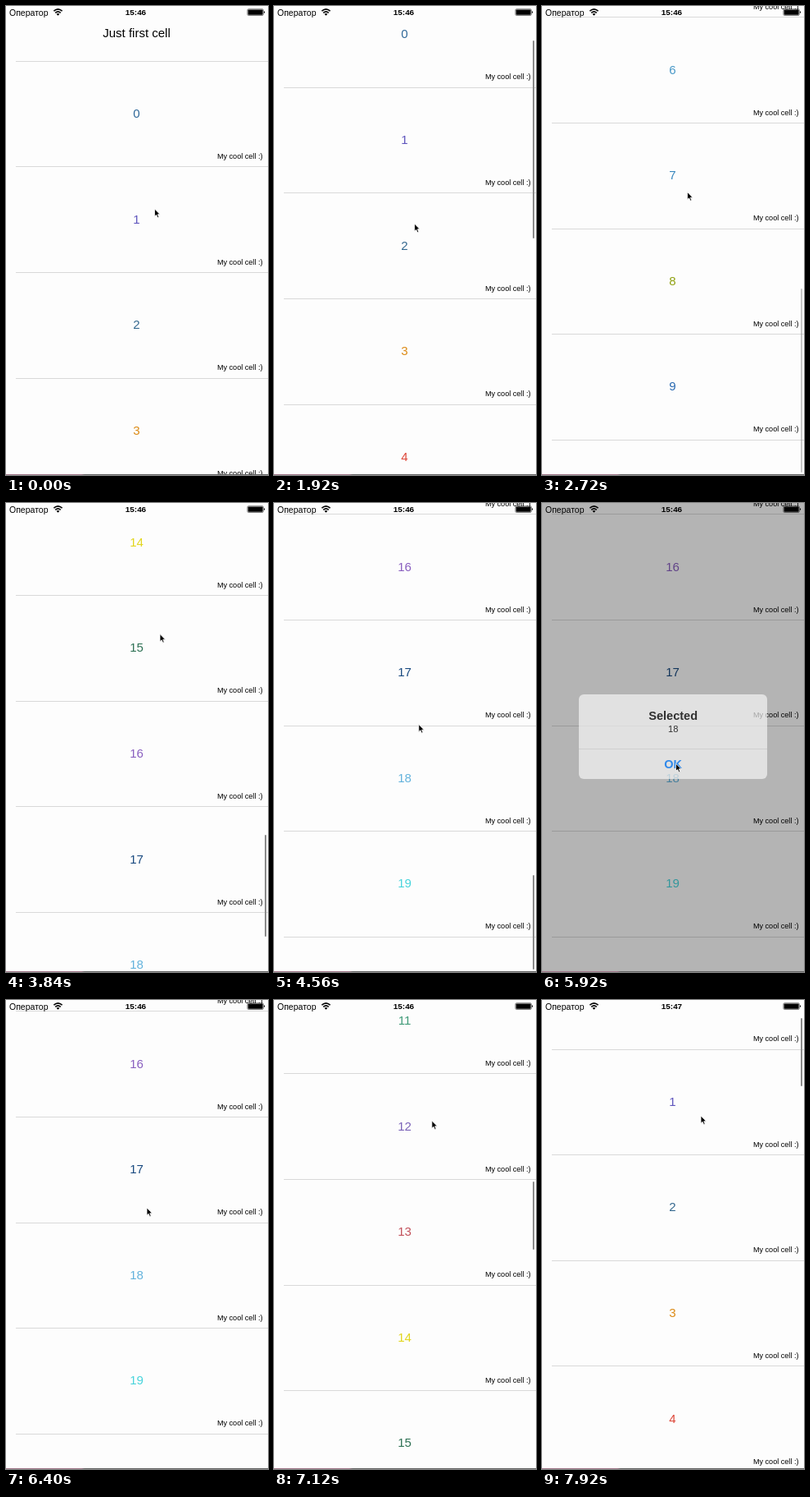
An HTML page that plays this animation: 320x571 px, repeating every 8000 ms.

```html
<!DOCTYPE html>
<html lang="en">
<head>
<meta charset="utf-8">
<title>Scrolling cells</title>
<style>
  html, body { margin: 0; width: 100%; height: 100%; overflow: hidden; background: #fdfdfd; }
  #stage {
    position: relative; width: 320px; height: 571px; overflow: hidden;
    background: #fdfdfd; color: #000;
    font-family: "Liberation Sans", Arial, sans-serif;
  }
  #stage * { position: absolute; white-space: nowrap; }
  #list { left: 0; top: 0; width: 320px; }
  #list h1, .cell b {
    margin: 0; left: 0; width: 319px; text-align: center;
    font: 15px/20px "Liberation Sans", Arial, sans-serif;
  }
  #list h1 { top: 23px; }
  .line { left: 12px; right: 0; height: 1px; background: #d9d9d9; }
  .cell { left: 0; width: 320px; height: 128.6px; }
  .cell b { top: 54px; }
  .cell i { right: 6.5px; top: 110px; font: 9.1px/13px "Liberation Sans", Arial, sans-serif; }
  .cell .line { bottom: -.8px; }
  #bar { left: 315.6px; width: 2.4px; border-radius: 2px; background: #8a8a8a; }
  #carrier { left: 4px; top: 1px; font-size: 10.5px; line-height: 14px; }
  #clock { left: 0; top: 1px; width: 317px; text-align: center; font-size: 9.9px; line-height: 14px; font-weight: bold; }
  #icons { left: 0; top: 0; }
  #dim { inset: 0; background: #000; }
  #alert {
    left: 44.5px; top: 232.9px; width: 230.4px; height: 103.4px;
    border-radius: 6px; background: rgba(247, 247, 247, .93); text-align: center;
  }
  #alert div { left: 0; width: 100%; line-height: 20px; }
  #alert .title { top: 15.5px; font-size: 14.5px; font-weight: bold; }
  #alert .message { top: 31.8px; font-size: 11.1px; }
  #alert .rule { top: 66.2px; height: 1px; background: rgba(0, 0, 0, .1); }
  #alert .ok { top: 75.4px; font-size: 14.5px; font-weight: bold; color: #007aff; }
  #cursor { left: 0; top: 0; overflow: visible; }
  #edge { left: 0; bottom: 0; width: 320px; height: 1px; background: linear-gradient(90deg, #a0788a 0 92px, #666 96px); }
</style>
</head>
<body>
<div id="stage">
  <div id="list"><h1>Just first cell</h1><div class="line" style="top:67px"></div></div>
  <div id="bar"></div>
  <div id="carrier">Оператор</div>
  <div id="clock"></div>
  <svg id="icons" width="320" height="16">
    <path d="M58.4 6.2Q63.5 1.6 68.6 6.2M60.3 8.3Q63.5 5.4 66.7 8.3" fill="none" stroke="#000" stroke-width="1.6"/>
    <path d="M63.5 11.8L61.6 9.7Q63.5 8.2 65.4 9.7Z"/>
    <rect x="294.9" y="3.7" width="19.4" height="7.8" rx="1.4" fill="none" stroke="#000" stroke-width=".5"/>
    <rect x="295.6" y="4.4" width="18" height="6.4" rx=".8"/>
    <path d="M315 6.2q1.2 .4 1.2 1.4t-1.2 1.4z"/>
  </svg>
  <div id="dim"></div>
  <div id="alert">
    <div class="title">Selected</div>
    <div class="message">18</div>
    <div class="rule"></div>
    <div class="ok">OK</div>
  </div>
  <div id="edge"></div>
  <svg id="cursor" width="10" height="14">
    <path d="M0 0V9.2L2.1 7.3L3.7 10.7L5.2 10L3.8 6.7H6.6Z" fill="#000" stroke="#fff" stroke-width=".8"/>
  </svg>
</div>
<script>
const LOOP = 8000, VIEW = 571, TOP = 67, ROW = 128.6, FOOTER = 43;
const PALETTE = (
  "#30699a #5f55bd #34688f #dc8a14 #dd4638 #b05aa0 #4a99c8 #3a88be #8fa010 #2a6ab2 " +
  "#d0742c #3f9a78 #7a62b8 #c2505a #e2d61c #2f7255 #8a60c0 #1a4a80 #62b2dc #48d4dc"
).split(" ");

const $ = id => document.getElementById(id);
const clamp = x => Math.min(1, Math.max(0, x));
const progress = (t, from, to) => clamp((t - from) / (to - from));
const easeIn = u => u ** 3;
const easeOut = u => 1 - (1 - u) ** 3;
const smooth = u => u * u * (3 - 2 * u);

const bottomOf = count => TOP + count * ROW + FOOTER - VIEW;
const flings = [
  { start: 1400, end: 2465, to: bottomOf(10), ease: easeIn },
  { start: 3300, end: 4533, to: bottomOf(20), ease: easeOut },
  { start: 6560, end: 8170, to: 0, ease: smooth }
];

// Each pose is reached at `at`, after a move of at most MOVE ms.
const MOVE = 560;
const poses = [
  { at: 0, x: 181.5, y: 247 },
  { at: 1400, x: 172, y: 340 },
  { at: 1920, x: 171.5, y: 265 },
  { at: 2720, x: 177.5, y: 226.5 },
  { at: 3840, x: 188, y: 159.5 },
  { at: 4800, x: 169.5, y: 340 },
  { at: 5600, x: 163, y: 321 },
  { at: 6400, x: 172, y: 253 },
  { at: 7200, x: 194, y: 141 }
];

const scrollAt = t => flings.reduce(
  (y, f) => y + (f.to - y) * f.ease(progress(t, f.start, f.end)), 0);

const barOpacity = t => Math.max(...flings.map(
  f => progress(t, f.start, f.start + 80) * (1 - progress(t, f.end + 100, f.end + 400))));

function pointerAt(t) {
  let { x, y, at } = poses[0];
  for (const pose of poses.slice(1)) {
    const u = smooth(progress(t, Math.max(at, pose.at - MOVE), pose.at));
    x += (pose.x - x) * u;
    y += (pose.y - y) * u;
    at = pose.at;
  }
  return `translate(${x}px, ${y}px)`;
}

const add = (parent, tag, text = "", name = "") => {
  const node = parent.appendChild(document.createElement(tag));
  node.textContent = text;
  node.className = name;
  return node;
};

const cells = Array.from({ length: 30 }, (_, n) => {
  const cell = add($("list"), "div", "", "cell");
  cell.style.top = TOP + n * ROW + "px";
  add(cell, "b", n).style.color = PALETTE[n % PALETTE.length];
  add(cell, "i", "My cool cell :)");
  add(cell, "div", "", "line");
  return cell;
});

function drawList(t) {
  const y = scrollAt(t);
  const count = t < 3120 ? 10 : t < 6300 ? 20 : 30;
  $("list").style.top = -y + "px";
  cells.forEach((cell, n) => cell.hidden = n >= count);

  const height = TOP + count * ROW;
  const length = VIEW * VIEW / height;
  const top = 2 + y / (height - VIEW) * (VIEW - 6 - length);
  $("bar").style.top = top + "px";
  $("bar").style.height = Math.min(length, VIEW - 3 - top) + "px";
  $("bar").style.opacity = barOpacity(t);
}

function drawAlert(t) {
  const shown = easeOut(progress(t, 4940, 5340));
  const visible = shown * (1 - progress(t, 5840, 6140));
  $("dim").style.opacity = .4 * visible;
  $("alert").style.opacity = visible;
  $("alert").style.transform = `scale(${1.33 - .33 * shown})`;
}

const start = performance.now();
function tick() {
  const t = (performance.now() - start) % LOOP;
  drawList(t);
  drawAlert(t);
  $("clock").textContent = t < 7200 ? "15:46" : "15:47";
  $("cursor").style.transform = pointerAt(t);
  requestAnimationFrame(tick);
}
tick();
</script>
</body>
</html>
```
